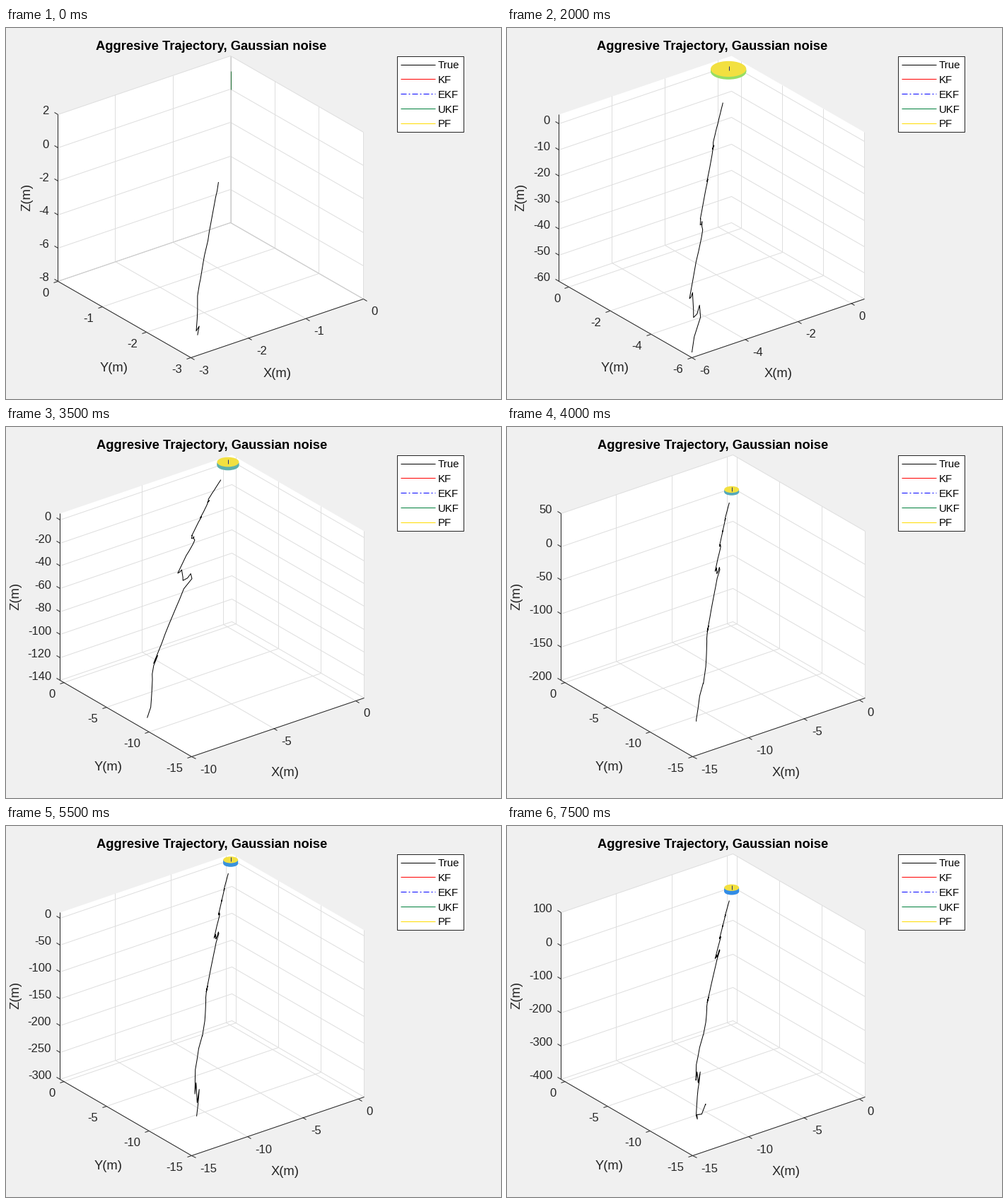
Animation, 700 px wide and 525 px high, one loop 8000 ms. Source, as a matplotlib script:

```python
import numpy as np
import matplotlib.pyplot as plt
from matplotlib.animation import FuncAnimation
from matplotlib.patches import Ellipse, Polygon, Rectangle

DPI = 100
PX = 72 / DPI
INK = "#262626"
RADIUS = 0.53

plt.rcParams["font.family"] = "Liberation Sans"
fig = plt.figure(figsize=(7, 5.25), dpi=DPI, facecolor="#f0f0f0")
ax = fig.add_axes([0, 0, 1, 1])


def depth_at(t):
    """Depth in metres reached after t seconds."""
    return np.interp(t, [0, 1, 2, 2.5, 3.5, 4, 5.5, 7.5],
                     [8, 30.8, 58, 83, 125, 164, 256, 378])


def drift(depth):
    """Sideways position (x = y) at a depth."""
    return np.interp(depth,
                     [3, 5.6, 8, 18, 26, 31, 46, 53, 58, 83, 120,
                      160, 205, 225, 256, 330, 378],
                     [-.85, -2.5, -2.5, -4.6, -4.2, -6, -5.7, -4.5, -6, -9.5,
                      -9.8, -13.7, -13.9, -12, -13.2, -14, -10])


def wobbly_flight():
    """Path samples, shaken in bouts evenly spaced on a log scale of depth."""
    rng = np.random.default_rng(4)
    log_d = np.arange(np.log(3.1), np.log(378), .05)
    depth = np.exp(log_d)
    bout = np.cos(np.pi * (log_d - 1.1) / .473) ** 6
    bout[0] = 0
    kick = rng.uniform(-1, 1, (2, len(depth))) * bout
    side = drift(depth) * (1 + .08 * kick[0])
    return depth, side, -depth * (1 + .09 * kick[1])


DEPTH, SIDE, HEIGHT = wobbly_flight()


def cylinder_top(t):
    return 1.8 + .18 * t * t


def side_axis(t, widen):
    """Limits and tick spacing for x or y, widening to 15 m at a given time."""
    reach, step = ((15, 5) if t >= widen else (10, 5) if t > 2
                   else (6, 2) if t > 0 else (3, 1))
    high = 0 if t < 1 else 2 if t < 2 else .5
    return -reach, high, step


def z_axis(t):
    depth, top = depth_at(t), cylinder_top(t)
    step = next(s for s in (2, 5, 10, 20, 50, 100) if (depth + top) / s < 6.55)
    count = np.ceil(depth / step - .1)
    high = 1.4 * top if count >= 6 else step
    return -max(count * step, depth), high, step


class Box:
    """Orthographic plot box mapped to stage pixels."""

    def __init__(self, t):
        self.wide = t > 2
        self.x, self.y, self.z = side_axis(t, 4), side_axis(t, 3), z_axis(t)
        self.front = np.array([262.5 if self.wide else 261, 466])
        self.ex = np.array([243 if self.wide else 244, -83])
        self.ey = np.array([-186.5 if self.wide else -188, -108])
        self.ez = np.array([0, -236])

    def unit(self, u, v, w):
        return self.front + u * self.ex + v * self.ey + w * self.ez

    def at(self, x, y, z):
        return self.unit(*[(p - lo) / (hi - lo) for p, (lo, hi, _)
                           in zip((x, y, z), (self.x, self.y, self.z))])


def ticks(axis):
    lo, hi, step = axis
    for value in np.arange(np.ceil(lo / step) * step, hi + 1e-6, step):
        yield (value - lo) / (hi - lo), str(round(value))


def line(points, color="k", snap=True, **kw):
    pts = np.asarray(points, float)
    pts = (np.round(pts) if snap else pts) + .5
    ax.plot(pts[:, 0], pts[:, 1], color=color, lw=PX,
            solid_capstyle="butt", **kw)


def text(x, y, s, size=12, color=INK, ha="center", **kw):
    va = "center" if "rotation" in kw else "center_baseline"
    ax.text(x, y - .5, s, fontsize=size, color=color, ha=ha, va=va, **kw)


def tick(p, step, dx, dy, label, ha):
    line([p, p + step], INK)
    text(p[0] + dx, p[1] + dy, label, ha=ha)


def draw_box(b):
    at = b.unit
    outline = [at(0, 0, 0), at(1, 0, 0), at(1, 0, 1),
               at(1, 1, 1), at(0, 1, 1), at(0, 1, 0)]
    ax.add_patch(Polygon(np.round(outline) + .5, fc="white", ec="none"))
    grid, edge = "#dedede", "#cccccc"
    for u, _ in ticks(b.x):
        line([at(u, 0, 0), at(u, 1, 0), at(u, 1, 1)], grid)
    for v, _ in ticks(b.y):
        line([at(0, v, 0), at(1, v, 0), at(1, v, 1)], grid)
    for w, _ in ticks(b.z):
        line([at(0, 1, w), at(1, 1, w), at(1, 0, w)], grid)
    if b.x[1] != .5:
        line([at(0, 1, 0), at(1, 1, 0), at(1, 0, 0)], edge)
        line([at(1, 1, 0), at(1, 1, 1)], edge)

    line([at(0, 1, 1), at(0, 1, 0), at(0, 0, 0), at(1, 0, 0)], INK)
    for u, s in ticks(b.x):
        tick(at(u, 0, 0), (5, 3), 11.5, 18, s, "left")
    for v, s in ticks(b.y):
        tick(at(0, v, 0), (-6, 2), -12, 16.5, s, "right")
    for w, s in ticks(b.z):
        tick(at(0, 1, w), (-5, -3), -12, -5, s, "right")


def draw_labels(b, t):
    text(291 if b.wide else 290, 25, "Aggresive Trajectory, Gaussian noise",
         13.2, "k", weight="bold")
    text(395 if b.wide else 384, 487.5, "X(m)", 13.2)
    text(145 if b.wide else 153, 480.5, "Y(m)", 13.2)
    text(14 if b.wide else 20 if t else 30, 239.5, "Z(m)", 13.2, rotation=90)


def draw_legend():
    ax.add_patch(Rectangle((552.5, 39.5), 94, 107, fc="white", ec=INK, lw=PX))
    rows = [("True", "k"), ("KF", "#ff0000"), ("EKF", "#0000ff"),
            ("UKF", "#00803c"), ("PF", "#ffdc00")]
    for i, (name, color) in enumerate(rows):
        y = 50.6 + 20.8 * i
        style = {"dashes": (8, 3, 2, 3)} if name == "EKF" else {}
        line([(557, y), (606, y)], color, **style)
        text(611, y + 1.5, name, 10.8, "k", ha="left")


def draw_cylinder(b, t):
    top = b.at(0, 0, cylinder_top(t))
    base = b.at(0, 0, max(0, 2.2 - .35 * t))
    scale = 2 * RADIUS / (b.x[1] - b.x[0])
    width = scale * np.hypot(b.ex[0], b.ey[0])
    height = scale * np.hypot(b.ex[1], b.ey[1])

    def disc(y, color):
        ax.add_patch(Ellipse((top[0] + .5, y + .5), width, height,
                             fc=color, ec="none", zorder=3))

    # The wall turns from green to blue as the cylinder grows
    mix = np.clip((t - 2) / 4, 0, 1) ** .6
    green, blue = np.array([150, 222, 100]), np.array([50, 140, 230])
    for y in np.arange(base[1], top[1] + 1, -1):
        disc(y, (green + mix * (blue - green)) / 255)
    disc(top[1], "#f2e040")


def draw_stem(b, t):
    if t <= 1:
        ends = [b.at(0, 0, 0), b.at(0, 0, 1.1 + 1.7 * t)]
    else:
        top = b.at(0, 0, cylinder_top(t))
        ends = [top + (0, 2), top - (0, 4)]
    line(ends, "#23307a" if t else "#1e6e32", zorder=4)


def draw(k):
    t = k / 2
    ax.clear()
    ax.set(xlim=(0, 700), ylim=(525, 0))
    ax.axis("off")
    b = Box(t)
    draw_box(b)
    draw_labels(b, t)
    draw_legend()
    if t >= 1:
        draw_cylinder(b, t)
    draw_stem(b, t)

    end = depth_at(t)
    seen = DEPTH < end
    flight = [b.at(s, s, z) for s, z in zip(SIDE[seen], HEIGHT[seen])]
    line(flight + [b.at(drift(end), drift(end), -end)], snap=False, zorder=5)
    return []


anim = FuncAnimation(fig, draw, frames=16, init_func=lambda: draw(0),
                     interval=500, repeat=True, repeat_delay=0, blit=False)
plt.show()
```
